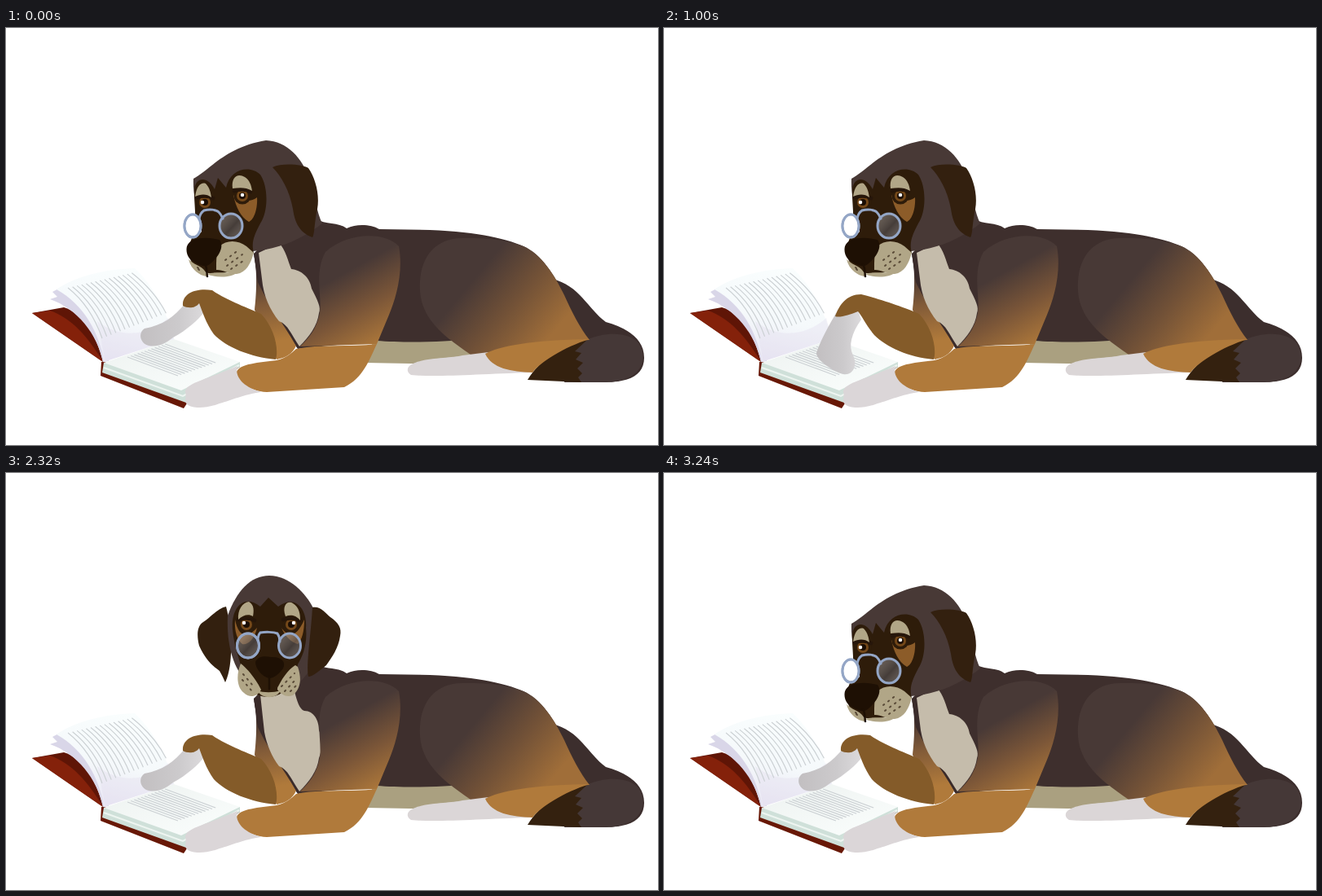
An HTML page that plays this animation: 800x512 px, repeating every 3280 ms.

```html
<!DOCTYPE html>
<html lang="en">
<head>
<meta charset="utf-8">
<title>Reading dog</title>
<style>
html, body { margin: 0; width: 100%; height: 100%; overflow: hidden; background: #fff; }
svg { display: block; width: 100vw; height: 100vh; }
</style>
</head>
<body>
<svg id="stage" viewBox="0 0 800 512" xmlns="http://www.w3.org/2000/svg">
  <defs>
    <linearGradient id="thigh" gradientUnits="userSpaceOnUse" x1="585" y1="295" x2="675" y2="370">
      <stop offset="0" stop-color="#483936"/><stop offset=".5" stop-color="#735237"/><stop offset="1" stop-color="#a06e39"/>
    </linearGradient>
    <linearGradient id="shoulder" gradientUnits="userSpaceOnUse" x1="402" y1="308" x2="450" y2="395">
      <stop offset="0" stop-color="#483936"/><stop offset=".5" stop-color="#7b5638"/><stop offset="1" stop-color="#af793a"/>
    </linearGradient>
    <linearGradient id="breast" gradientUnits="userSpaceOnUse" x1="315" y1="300" x2="330" y2="385">
      <stop offset="0" stop-color="#463531"/><stop offset=".45" stop-color="#805a38"/><stop offset="1" stop-color="#b07a3b"/>
    </linearGradient>
    <linearGradient id="page" x1=".7" y1="0" x2=".4" y2="1">
      <stop offset="0" stop-color="#fafefe"/><stop offset=".55" stop-color="#f5f9fb"/><stop offset="1" stop-color="#e9e6f4"/>
    </linearGradient>
    <linearGradient id="flat" x1="0" y1="0" x2="1" y2="1">
      <stop offset="0" stop-color="#edf2f0"/><stop offset="1" stop-color="#fbfefd"/>
    </linearGradient>
    <linearGradient id="glass" x1="0" y1="0" x2="1" y2="1">
      <stop offset="0" stop-color="#c8c8cc" stop-opacity=".4"/><stop offset=".55" stop-color="#555358" stop-opacity=".6"/><stop offset="1" stop-color="#b8bbc4" stop-opacity=".4"/>
    </linearGradient>
    <linearGradient id="fur" x1="0" y1="0" x2="1" y2="0">
      <stop offset="0" stop-color="#c2bfc1"/><stop offset=".6" stop-color="#cccacc"/><stop offset="1" stop-color="#dcdadc"/>
    </linearGradient>
  </defs>

  <g id="book">
    <path fill="#5f1506" d="M32 350L71 343C95 350 112 380 119 410Z"/>
    <path fill="#84210a" d="M32 350L54 347C80 356 100 378 119 410Z"/>
    <path fill="#d9d6e8" d="M54 333L63 330L57 324L68 318C100 335 125 370 126 409L119 410C112 376 88 345 54 333Z"/>
    <path fill="url(#page)" d="M62 321C88 303 125 296 158 295C182 318 198 350 206 382L120 410C115 375 96 340 62 321Z"/>
    <path fill="#dedbea" opacity=".35" d="M112 360C140 382 175 378 199 356L206 382L122 409Z"/>
    <path fill="#681806" d="M117 410L287 416L222 461L218 467L116 427Z"/>
    <path fill="#cfe0d9" d="M120 411L287 410V416L221 460L118 423Z"/>
    <path fill="none" stroke="#eef5f1" stroke-width="2" d="M120 417L217 452L286 414"/>
    <path fill="url(#flat)" d="M120 411L206 382L287 410L215 445Z"/>
    <path id="lines" fill="none" stroke="#ccd1d4" stroke-width="1.2"/>
  </g>

  <g id="body">
    <path fill="#3c2e2d" d="M670 308C704 316 714 345 736 361C760 368 783 380 783 405C783 426 765 435 735 435L700 435L704 384Z"/>
    <path fill="#453837" d="M712 383C734 373 765 372 777 388C790 410 775 435 735 435L685 435L690 390Z"/>
    <path fill="#34210f" d="M640 432C655 407 683 390 714 382L698 397L706 399L699 407L708 411L701 418L707 424L702 429L706 435Z"/>
    <path fill="#aaa080" d="M441 411L452 380H540L578 402C550 408 520 413 495 412Z"/>
    <path fill="#3e2f2d" d="M304 277L340 240L380 234C392 242 408 238 418 246C430 240 448 241 458 247L520 248C580 250 617 260 635 268C657 278 673 303 685 328L716 383L546 384C520 386 480 386 455 384L358 394L312 325Z"/>
    <path fill="url(#thigh)" d="M508 322C506 284 525 258 560 258C600 257 622 263 635 268C657 278 673 303 685 328C694 348 704 368 716 383C690 385 645 386 618 392C600 396 585 403 573 403C545 383 510 362 508 322Z"/>
    <path fill="#dbd6d7" d="M494 416C505 404 545 406 560 402L592 398L643 423C580 425 525 429 497 426C492 423 492 419 494 416Z"/>
    <path fill="#b07a3b" d="M588 400C604 391 645 383 716 382C684 392 656 410 646 423C620 422 596 418 588 400Z"/>
    <path fill="url(#breast)" d="M304 277L312 308C325 340 345 370 356 390C352 400 343 405 332 407L305 346C307 330 309 300 304 277Z"/>
    <path fill="#3a2b2a" d="M304 277L320 270L364 390L357 392C345 370 322 340 309 312Z"/>
  </g>
  <g id="chest"></g>
  <g id="arm"></g>
  <path fill="url(#shoulder)" d="M392 275C420 250 465 250 482 268C488 300 478 333 470 352L455 388L361 391C376 377 382 365 385 350C388 330 378 300 392 275Z"/>
  <path fill="#b07a3b" d="M356 394C385 388 420 392 455 388C446 407 438 430 415 441L320 447C298 446 278 432 283 422C287 412 310 411 332 408C345 405 350 399 356 394Z"/>
  <path fill="#dbd6d8" d="M220 447C220 436 245 432 284 415C280 427 290 441 314 447C290 450 278 457 262 461C247 467 229 468 222 462C218 457 222 452 220 447Z"/>
  <g id="head"></g>
</svg>

<script>
const LOOP = 3280, STEP = 40;
const MASK = "#2e1c0a", EAR = "#33200f", CREAM = "#b1a687", TAN = "#8c5c29";
const byId = id => document.getElementById(id);
const morphs = [];

// A morph owns three poses with matching path commands.
function morph(group, poses, attrs) {
  const node = document.createElementNS("http://www.w3.org/2000/svg", "path");
  for (const key in attrs) node.setAttribute(key, attrs[key]);
  byId(group).append(node);
  const values = poses.map(d => d.match(/-?\d+(\.\d+)?/g).map(Number));
  const commands = poses[0].split(/-?\d+(?:\.\d+)?/);
  morphs.push({ node, values, commands, group });
}
const shape = (group, fill, ...poses) => morph(group, poses, { fill });
const head = (fill, ...poses) => shape("head", fill, ...poses);
const stroke = (color, width, poses, extra) =>
  morph("head", poses, { fill: "none", stroke: color, "stroke-width": width, "stroke-linecap": "round", ...extra });
const dot = (color, size, ...points) => stroke(color, size, points.map(([x, y]) => `M${x} ${y}h0.01`));
const ring = ([x, y, rx, ry]) =>
  `M${x - rx} ${y}a${rx} ${ry} 0 1 0 ${2 * rx} 0a${rx} ${ry} 0 1 0 ${-2 * rx} 0`;

shape("chest", "#c5bcab",
  "M310 276L335 264C343 272 346 286 350 296C362 297 373 306 375 320C382 334 387 343 384 350C382 366 372 379 360 391C350 376 346 364 335 360C324 346 316 330 314 308Z",
  "M316 312L338 256C347 270 350 288 354 295C366 298 375 308 379 319C386 332 388 343 384 350C382 366 372 379 360 391C352 378 349 365 337 360C325 348 318 334 316 318Z",
  "M312 272L354 268C357 280 360 290 366 292C378 292 384 304 384 316C390 328 387 342 384 350C382 366 372 379 360 391C350 376 346 364 335 360C326 348 320 334 317 318Z");

const sleeve = "C270 334 300 345 313 351C329 368 335 393 331 407";
shape("arm", "url(#fur)",
  "M220 338C206 355 192 365 170 369C162 374 164 387 175 390C186 392 195 388 205 380C222 371 236 358 243 349L236 336Z",
  "M211 350C203 365 196 375 187 399C187 408 208 422 220 425C232 427 238 414 232 402C226 390 230 375 242 358L237 344Z",
  "M233 359C229 380 222 395 206 408C200 415 203 426 212 428C222 430 228 427 232 421C240 405 255 385 257 374L246 357Z");
shape("arm", "#845b29",
  `M217 341C216 325 234 319 253 322${sleeve}C300 404 270 392 255 376C245 362 241 348 237 338C232 345 222 344 217 341Z`,
  `M210 354C215 340 224 327 242 327${sleeve}C300 404 273 392 258 377C248 365 242 352 238 348C228 352 216 356 210 354Z`,
  `M232 363C230 345 236 332 254 332${sleeve}C300 404 275 394 262 380C254 369 252 362 248 360C242 360 236 367 232 363Z`);

// The left ear sits behind the skull and is hidden in profile.
head(EAR,
  "M250 190C245 190 240 195 240 200C238 208 238 215 240 222C244 230 246 235 248 240C250 242 251 242 252 242C254 235 254 225 252 215C252 205 251 198 250 190Z",
  "M252 183C240 178 226 182 221 195C215 210 217 228 226 238C238 248 246 255 249 268C252 262 250 256 252 250C246 235 240 220 244 205C246 195 248 190 252 183Z",
  "M270 164C260 166 250 178 242 183C234 188 234 200 237 212C245 230 255 238 262 243C266 250 268 255 269 257C275 245 277 225 276 200C275 190 273 175 270 164Z");
head("#483936",
  "M230 185C250 174 270 146 319 138C345 139 364 160 372 185C378 205 382 228 388 240C360 262 330 272 303 274C260 268 228 235 230 185Z",
  "M247 190C252 160 275 138 308 138C342 139 366 160 371 185C374 205 374 225 370 240C335 250 340 285 300 287C252 270 236 235 247 190Z",
  "M272 175C283 145 300 126 323 126C348 126 368 148 377 166C382 195 380 225 374 240C360 262 345 270 323 272C286 262 270 225 272 175Z");
head(EAR,
  "M327 171C340 165 365 168 371 172C380 185 385 205 382 222C378 240 379 252 376 257C365 253 355 245 352 222C348 200 338 182 327 171Z",
  "M369 180C380 175 392 176 397 182C408 195 407 210 400 228C402 240 408 240 414 242C400 248 385 246 370 240C373 220 373 195 369 180Z",
  "M376 165C386 163 392 172 398 177C408 184 412 190 410 200C408 215 400 226 393 236C383 244 376 250 371 250C368 235 374 200 376 165Z");
head(MASK,
  "M231 198C233 182 248 182 256 198L260 184L270 196C275 172 300 168 312 180C322 195 322 225 312 240C306 252 300 262 304 276C290 300 260 305 245 300C225 295 220 275 228 258C236 240 230 215 231 198Z",
  "M244 222C252 200 275 195 288 215L301 197L314 212C318 184 342 182 353 195C364 215 372 230 354 245C340 255 340 270 341 285C335 310 310 312 300 311C280 313 262 300 264 285C268 262 242 245 244 222Z",
  "M278 192C276 165 292 148 312 164L322 153L334 164C355 148 370 168 368 190C370 210 364 225 358 235C356 250 352 262 340 268C335 274 325 275 322 275C310 275 300 270 296 258C288 235 280 215 278 192Z");

// Eyes, with the pale brows drooping over them
head(TAN,
  "M279 205C285 212 300 215 308 208C309 220 305 235 298 238C288 232 282 220 279 205Z",
  "M318 215C325 235 345 235 352 215C350 230 350 240 347 246C335 245 320 235 318 215Z",
  "M338 190C345 200 355 205 366 180C366 195 363 205 358 210C350 208 342 200 338 190Z");
head(TAN,
  "M235 207C238 218 250 220 254 212C254 218 250 224 248 224C242 222 237 216 235 207Z",
  "M259 220C265 232 280 232 288 218C285 235 275 243 262 246C260 238 258 230 259 220Z",
  "M281 180C285 200 295 205 308 190C305 205 295 212 290 210C284 205 280 195 281 180Z");
const eyes = [[[290, 206], [335, 222], [350, 186]], [[244, 214], [271, 224], [295, 186]]];
for (const eye of eyes) {
  dot(MASK, 21, ...eye);
  dot("#744819", 14, ...eye);
  dot("#1b0e04", 8, ...eye);
  stroke("#26160a", 4.5, eye.map(([x, y]) => `M${x - 10} ${y - 6}C${x - 4} ${y - 8} ${x + 5} ${y - 8} ${x + 10} ${y - 5}`));
}
dot("#fff", 4.5, [290, 205], [339, 220], [353, 184]);
dot("#fff", 4.5, [241, 214], [268, 222], [292, 184]);
head(CREAM,
  "M278 197C276 182 285 178 293 183C299 187 301 193 302 200C294 195 286 196 278 197Z",
  "M324 213C322 198 332 192 340 194C348 196 351 203 351 209C342 206 333 207 324 213Z",
  "M343 176C338 162 346 156 352 160C360 165 361 173 361 181C355 174 349 174 343 176Z");
head(CREAM,
  "M232 207C234 193 240 189 245 191C250 196 251 202 252 208C246 203 238 204 232 207Z",
  "M253 216C255 206 262 202 270 203C280 203 284 209 285 214C275 212 264 212 253 216Z",
  "M285 180C284 168 290 159 298 158C305 162 304 170 303 176C298 173 291 174 285 180Z");

// Muzzle
head(CREAM,
  "M246 302C256 299 272 301 284 300C276 307 258 307 246 302Z",
  "M290 308C296 310 306 310 312 306C306 312 296 313 290 308Z",
  "M308 267C316 270 328 270 337 267C332 278 314 278 308 267Z");
head(CREAM,
  "M262 268C270 260 285 260 295 268L304 276C300 290 295 300 283 302C272 302 265 296 258 297C258 285 258 275 262 268Z",
  "M311 300C316 288 328 280 338 281L343 290C341 300 335 308 324 308C316 308 310 304 308 303C308 302 310 301 311 300Z",
  "M334 262C340 250 348 240 355 236L358 238C364 255 360 266 352 273C344 276 338 272 333 266C333 264 333 263 334 262Z");
head(CREAM,
  "M224 284C230 290 238 292 242 296C246 300 247 304 246 305C238 304 227 297 224 284Z",
  "M264 281C276 286 292 296 296 306C288 315 275 316 268 312C258 306 260 295 264 281Z",
  "M288 234C296 240 306 252 313 266C308 276 298 276 292 270C282 262 283 246 288 234Z");
const whiskers = { "stroke-dasharray": "1.5 6" };
stroke("#5a4b38", 2, [
  "M269 285L286 272M271 292L290 278M276 296L291 286",
  "M316 300L334 288M319 304L337 294M326 305L337 299",
  "M338 262L354 246M342 268L356 253M349 268L357 260"], whiskers);
stroke("#5a4b38", 2, [
  "M235 294L237 296M236 296L238 298",
  "M268 289L283 300M267 297L281 307",
  "M291 247L303 261M290 254L302 268"], whiskers);
head("#1e1004",
  "M222 268C226 257 245 256 262 260C268 268 262 280 250 290C242 296 232 288 226 284C221 278 221 272 222 268Z",
  "M276 282C280 270 290 274 310 272C325 272 326 282 318 290C310 298 305 299 300 298C290 298 278 290 276 282Z",
  "M306 232C310 224 318 225 325 226C338 225 344 232 340 240C334 248 328 252 323 252C314 250 306 240 306 232Z");
stroke("#1e1004", 2.5, [
  "M244 290C247 294 246 300 247 305",
  "M300 296C300 300 300 304 300 308",
  "M323 250C323 255 323 260 323 265"]);

// Spectacles
const rim = (fill, ...lenses) => stroke("#94a6c6", 3, lenses.map(ring), { fill });
const leftLens = [[229, 243, 10, 14], [270, 259, 16, 15], [297, 212, 13.5, 15]];
rim("url(#glass)", ...leftLens);
head("#fff",
  "M220 243C220 232 229 228 235 231C238 238 239 244 240 250C231 260 220 255 220 243Z",
  "M264 262C266 258 272 256 275 254C274 262 271 268 268 271C265 270 263 266 264 262Z",
  "M290 222C290 222 290 222 290 222C290 222 290 222 290 222C290 222 290 222 290 222Z");
rim("none", ...leftLens);
rim("url(#glass)", [276, 243, 14, 15], [333, 255, 16, 15], [348, 212, 13.5, 15]);
stroke("#94a6c6", 3, [
  "M237 234C238 228 240 226 243 224C250 222 258 223 261 226C264 229 265 232 266 234",
  "M285 252C286 246 288 243 290 241C298 239 308 239 314 241C316 244 317 247 318 250",
  "M309 206C309 201 310 198 312 196C318 195 328 195 333 197C335 200 336 203 336 207"]);

// Printed lines on both pages
let lines = "";
for (let i = 0; i < 15; i++) {
  const x = 76 + i * 5.6, y = 319 - i * 1.3;
  lines += `M${x} ${y}Q${x + 28} ${y + 22} ${x + 42} ${y + 62 - i * 0.9}`;
}
for (let i = 0; i < 12; i++) {
  const x = 149 + i * 4.2, y = 404 - i * 1.45;
  lines += `M${x} ${y}L${x + 62} ${y + 23}`;
}
byId("lines").setAttribute("d", lines);

const ease = u => { u = Math.min(1, Math.max(0, u)); return u * u * (3 - 2 * u); };
const swing = (t, rise, top, fall, rest) =>
  2 * (ease((t - rise) / (top - rise)) - ease((t - fall) / (rest - fall)));

function draw(t) {
  const turn = swing(t, 1640, 2040, 2680, 3080);
  const reach = swing(t, 40, 360, 800, 1200);
  for (const { node, values, commands, group } of morphs) {
    const pose = group === "arm" ? reach : turn;
    const i = pose < 1 ? 0 : 1, mix = pose - i;
    let d = commands[0];
    values[0].forEach((_, k) => {
      const a = values[i][k], b = values[i + 1][k];
      d += +(a + (b - a) * mix).toFixed(2) + commands[k + 1];
    });
    node.setAttribute("d", d);
  }
}

const start = performance.now();
function tick(now) {
  const t = Math.max(0, now - start) % LOOP;
  draw(Math.floor(t / STEP) * STEP);
  requestAnimationFrame(tick);
}
draw(0);
requestAnimationFrame(tick);
</script>
</body>
</html>
```
